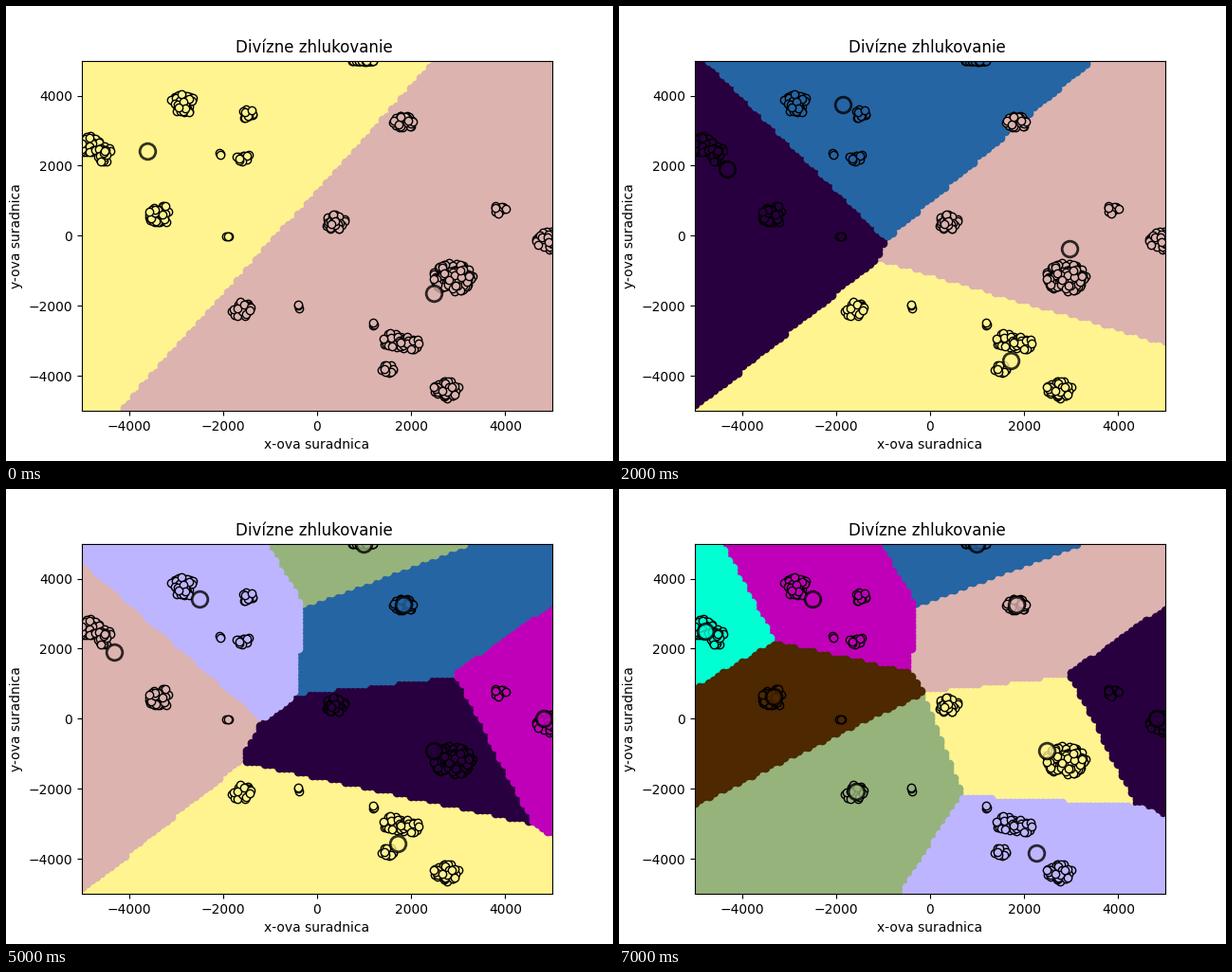
Write a matplotlib script that moves like this. It is 640 px wide and 480 px high and loops after 8 s.

```python
import numpy as np
import matplotlib.pyplot as plt
from matplotlib.animation import FuncAnimation

LIMIT = 5000
COLORS = ["#fff48f", "#dcb3af", "#29003f", "#2565a3", "#c000b8",
          "#96b37c", "#bdb5ff", "#00ffd2", "#4d2800"]

# blob radius -> blob centres; the number of points follows from the radius
BLOBS = {
    430: [(2880, -1180)],
    270: [(-2850, 3780), (-4850, 2600), (-3340, 600),
          (1010, 5220), (2740, -4370), (4930, -130)],
    220: [(-4540, 2330), (-1610, -2090), (390, 390),
          (1840, 3240), (1600, -2990), (1950, -3040)],
    145: [(-1510, 3490), (-1590, 2260), (3880, 780), (1490, -3790)],
    70: [(-2050, 2370), (-1930, 0), (-370, -2020), (1235, -2505)],
}
AREA_PER_POINT = 1500

ROOTS = [(-3609, 2430), (2470, -1640)]

# index of the cluster to split, then the centres of its two halves
SPLITS = [
    (1, (1710, -3570), (2965, -381)),
    (0, (-4315, 1910), (-1855, 3745)),
    (1, (2470, -909), (4083, 782)),
    (4, (1825, 3258), (4810, 0)),
    (2, (978, 4985), (-2510, 3433)),
    (0, (-1563, -2059), (2268, -3831)),
    (0, (-4788, 2513), (-3327, 620)),
]


def nearest(points, centres):
    gaps = points[:, None, :] - np.array(centres)[None, :, :]
    return (gaps ** 2).sum(axis=2).argmin(axis=1)


def make_points():
    rng = np.random.default_rng(7)
    parts = []
    for spread, centres in BLOBS.items():
        count = spread ** 2 // AREA_PER_POINT
        for centre in centres:
            angle = rng.uniform(0, 2 * np.pi, count)
            radius = spread * rng.random(count) ** 0.55
            offset = np.column_stack([np.cos(angle), np.sin(angle)])
            parts.append(centre + radius[:, None] * offset)
    return np.clip(np.vstack(parts), -LIMIT, LIMIT)


def divide(points, centres):
    label = nearest(points, centres)
    return [(c, points[label == i]) for i, c in enumerate(centres)]


def make_stages(points):
    """Each stage is a list of (centre, member points)."""
    stages = [divide(points, ROOTS)]
    for index, *halves in SPLITS:
        clusters = list(stages[-1])
        _, points = clusters.pop(index)
        stages.append(clusters + divide(points, halves))
    return stages


axis = np.arange(-LIMIT, LIMIT + 1, 100)
grid = np.array([(x, y) for x in axis for y in axis], float)
stages = make_stages(make_points())

fig, ax = plt.subplots(figsize=(6.4, 4.8), dpi=100)
ax.set_xlim(-LIMIT, LIMIT)
ax.set_ylim(-LIMIT, LIMIT)
ax.set_title("Divízne zhlukovanie ")
ax.set_xlabel("x-ova suradnica")
ax.set_ylabel("y-ova suradnica")


def dots(**style):
    return [ax.plot([], [], "o", color=c, **style)[0] for c in COLORS]


areas = dots(markersize=6, zorder=2)
members = dots(markersize=6, markeredgecolor="black", zorder=2.1)
centres = dots(markersize=12, markeredgecolor="black", markeredgewidth=2,
               alpha=0.8, zorder=2.2)


def draw(step):
    clusters = stages[step]
    owner = nearest(grid, [c for c, _ in clusters])
    lines = areas + members + centres
    for line in lines:
        line.set_data([], [])
    for i, (centre, points) in enumerate(clusters):
        areas[i].set_data(*grid[owner == i].T)
        members[i].set_data(*points.T)
        centres[i].set_data([centre[0]], [centre[1]])
    return lines


anim = FuncAnimation(fig, draw, frames=len(stages), interval=1000,
                     repeat=True, repeat_delay=0, blit=False)
plt.show()
```
